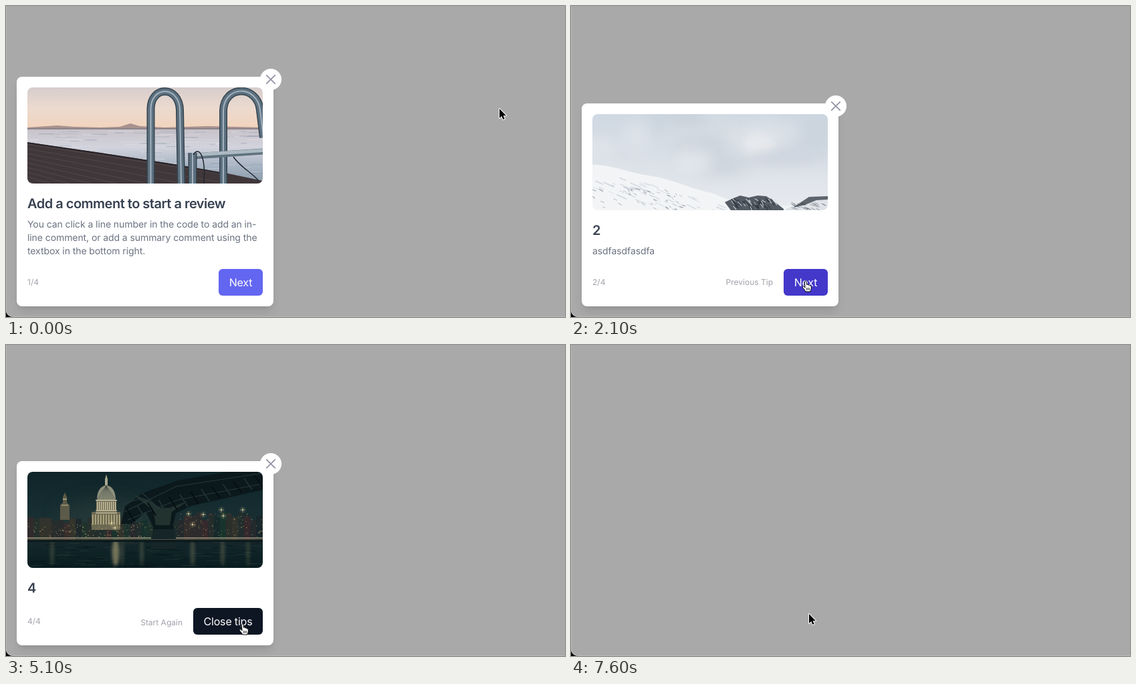
An HTML page with a canvas for the animation above (9570 ms loop, 836x466 px).

```html
<!DOCTYPE html>
<html lang="en">
<head>
<meta charset="utf-8">
<title>Tips</title>
<style>
  html, body { margin: 0; width: 100%; height: 100%; overflow: hidden; background: #000; }
  body { position: relative; font: 14px/20px Inter, sans-serif; font-optical-sizing: none;
    text-rendering: geometricPrecision; cursor: default; }
  #page { position: absolute; left: 0; top: 0; width: 836px; height: 466px; overflow: hidden;
    background: #a9a9a9; border-bottom-left-radius: 10px; box-shadow: inset 1px -1px #b8b8b8; }
  .card { position: absolute; left: 16px; bottom: 16px; width: 352px; padding: 16px; background: #fff;
    border-radius: 8px; visibility: hidden;
    box-shadow: 0 10px 15px -3px rgba(0,0,0,.1), 0 4px 6px -2px rgba(0,0,0,.05); }
  .card.on { visibility: visible; }
  .close { position: absolute; right: -12px; top: -12px; width: 32px; height: 32px;
    border-radius: 50%; background: #fff; }
  canvas { display: block; margin-bottom: 16px; border-radius: 8px; }
  h2 { margin: 0; font-size: 20px; line-height: 28px; font-weight: 600; letter-spacing: -.025em; color: #374151; }
  p { margin: 8px 0 0; letter-spacing: -.006em; color: #6b7280; white-space: nowrap; }
  footer { display: flex; align-items: center; height: 40px; margin-top: 16px;
    font-size: 12px; color: #a1a1aa; white-space: nowrap; }
  .link { margin: 0 16px 0 auto; }
  .btn { flex: none; border-radius: 6px; background: #6366f1; color: #fff; text-align: center;
    font-size: 16px; line-height: 40px; letter-spacing: -.011em; }
  .btn.hover { background: #4338ca; }
  .btn.dark { background: #0e1624; }
  #over { position: absolute; left: 0; top: 0; }
</style>
</head>
<body>
<div id="page"></div>
<svg id="over" width="836" height="466">
  <g id="ring" fill="none">
    <circle r="26.4" stroke="#fff" stroke-width="1.8"/>
    <circle r="28.6" stroke="#000" stroke-width="3"/>
  </g>
  <path id="arrow" d="M0 0V14L3.2 11.1L5.4 16L7.7 15L5.6 10.2H10Z" stroke="#fff" stroke-width="2"
    paint-order="stroke" stroke-linejoin="round"/>
  <g id="hand" stroke="#000" stroke-linejoin="round" stroke-linecap="round">
    <path fill="#fff" d="M-1.7 1.3C-1.7-.6 1-.6 1.1 1.3L1.5 5.4C2.2 4.6 3.5 4.8 3.8 6.2C4.8 5.4 6.1 5.9 6.3 7.2
      C7.3 6.6 8.3 7.2 8.3 8.4V11C8.3 13 7.1 13.6 7 16H-.4C-.8 13.6-3.2 12.2-4.7 9.4C-5.4 7.9-3.6 7.1-2.5 8.4L-1.2 9.8Z"/>
    <path fill="none" stroke-width=".8" d="M1.4 10.6V13.4M3.4 10.6V13.4M5.4 10.6V13.4"/>
  </g>
</svg>
<script>
const LOOP = 9570, STEP = 100;
const $ = id => document.getElementById(id);

let seed = 1;
const rnd = (a = 0, b = 1) => {
  seed = (seed * 16807) % 2147483647;
  return a + (b - a) * seed / 2147483647;
};

// Small drawing kit on a 352 x 144 canvas
const kit = c => ({
  fade(y, h, ...colors) {
    const g = c.createLinearGradient(0, y, 0, y + h);
    colors.forEach((k, i) => g.addColorStop(i / (colors.length - 1), k));
    c.fillStyle = g;
    c.fillRect(0, y, 352, h);
  },
  fill(color, d) { c.fillStyle = color; c.fill(new Path2D(d)); },
  line(color, w, d) { c.strokeStyle = color; c.lineWidth = w; c.stroke(new Path2D(d)); },
  rect(color, x, y, w, h) { c.fillStyle = color; c.fillRect(x, y, w, h); },
  blob(color, x, y, rx, ry, blur) {
    c.filter = `blur(${blur}px)`;
    c.fillStyle = color;
    c.beginPath();
    c.ellipse(x, y, rx, ry, 0, 0, 7);
    c.fill();
    c.filter = 'none';
  }
});

function pier({ fade, fill, line, rect }) {
  fade(0, 63, '#d6cdcc', '#ecdacf', '#f2d3bb');
  fill('#a8928f', 'M0 60L45 57L70 59L110 60L138 59L154 54L168 58L205 60L270 58L352 60V63H0Z');
  fade(62, 82, '#c8c2c9', '#d2d3dc', '#a9b5c4', '#8999a9');
  rect('#77727a', 0, 61.5, 352, 1.2);
  for (let i = 0; i < 130; i++) {
    const y = 65 + 78 * rnd() ** 1.3;
    rect(i % 2 ? 'rgba(116,132,153,.35)' : 'rgba(235,233,238,.4)', rnd(-20, 340), y, rnd(8, 38), rnd(.5, 1.4));
  }
  fill('#40373a', 'M0 82L110 98L220 115L300 129L352 140V144H0Z');
  for (let i = 0; i < 10; i++)
    line('rgba(112,94,90,.4)', 1, `M0 ${85 + i * 7}L300 ${131 + i * 13}`);
  line('#211f25', 1.5, 'M0 83L110 99L220 116L300 130');
  const tube = (w, d) => {
    line('#34444f', w, d);
    line('#5d707f', w - 3, d);
    line('#a3b3bf', 2, d);
  };
  tube(12, 'M293 144V35C294-4 344-4 348 34L353 75');
  line('#60737f', 9, 'M250 103L352 96');
  line('#adbac4', 5, 'M250 101L352 94.5');
  tube(13, 'M247 144V98');
  tube(12, 'M184.5 144V32C185-3 227-3 228 34L230 144');
  line('#20262d', 1.5, 'M248 101C256 88 267 100 264 144M308 104C320 121 334 126 346 140');
}

function peaks({ fade, fill, line, blob }) {
  fade(0, 144, '#cfd8e2', '#dbe1e8', '#e8eaee');
  for (let i = 0; i < 22; i++)
    blob(i % 2 ? 'rgba(192,201,213,.3)' : 'rgba(236,237,240,.35)', rnd(0, 352), rnd(0, 95), rnd(20, 48), rnd(12, 24), 10);
  blob('rgba(238,238,240,.7)', 250, 46, 24, 16, 7);
  blob('rgba(196,204,215,.5)', 285, 66, 50, 12, 8);
  fill('#f2f4f6', 'M0 76C30 76 52 87 84 92C120 97 150 113 178 118L205 129L290 138L352 124V144H0Z');
  for (let i = 0; i < 60; i++) {
    const x = rnd(0, 190), y = 84 + x * .24 + rnd(0, 32), w = rnd(4, 16);
    line('rgba(170,181,196,.4)', rnd(.6, 2), `M${x} ${y}l${w} ${w * .45}`);
  }
  for (let i = 0; i < 40; i++) {
    const x = rnd(0, 145);
    line('rgba(98,104,114,.55)', rnd(.5, 1.3), `M${x} ${rnd(105, 138) + x * .06}l${rnd(2, 6)} ${rnd(1, 4)}`);
  }
  fill('#555c65', 'M198 132L211 126L221 122L234 125L247 122L260 123L271 130L286 142V144H207Z');
  fill('#dfe3e8', 'M286 144L306 134L324 124L352 122V144Z');
  fill('#5e646c', 'M300 140L324 124L352 123V128L335 129L318 136Z');
  for (let i = 0; i < 60; i++) {
    const x = rnd(205, 272);
    line(i % 3 ? 'rgba(42,47,55,.7)' : 'rgba(218,224,231,.8)', 1.2, `M${x} ${rnd(126, 138)}l${rnd(2, 7)} ${rnd(3, 8)}`);
    if (i % 2) line('rgba(75,80,88,.5)', 1, `M${rnd(296, 345)} ${rnd(132, 142)}l6 3`);
  }
}

function night({ fade, fill, line, rect, blob }) {
  fade(0, 102, '#0f2529', '#152c30', '#1f3436');
  blob('rgba(70,80,70,.3)', 118, 66, 70, 22, 14);
  // Skyline
  for (let x = 0; x < 352; x += 9) {
    const y = x > 225 ? rnd(58, 74) : rnd(68, 78);
    rect(`rgba(${rnd(22, 58)},${rnd(38, 54)},44,.9)`, x, y, 9, 102 - y);
  }
  // Small tower
  fill('#5c5a48', 'M49 72V50L53 46V38L56 31L59 38V46L63 50V72Z');
  rect('#a39a78', 53, 40, 6, 2);
  rect('#918a6c', 51, 49, 10, 2);
  // Dome
  fill('#8d8f7b', 'M104 42C104 28 110 21 118 20C126 21 132 28 132 42Z');
  fill('#aaa88e', 'M116 20V11L118 4L120 11V20Z');
  rect('#77745d', 103, 42, 30, 18);
  rect('#6b6852', 96, 60, 43, 27);
  for (let x = 104; x < 133; x += 3) {
    rect('#cdc4a0', x, 45, 1.3, 12);
    line('rgba(58,66,60,.6)', .8, `M${x} 42Q${(x + 118) / 2} 29 118 21`);
  }
  for (const y of [42, 57.5, 61]) rect('#d6ccaa', 102, y, 32, 1.3);
  for (let x = 97; x < 138; x += 4) rect('#b9ae86', x, 64, 1.6, 15);
  // Window lights
  for (let i = 0; i < 320; i++) {
    const x = rnd(0, 352);
    rect(`rgba(218,186,122,${rnd(.15, .8)})`, x, rnd(x > 225 ? 62 : 76, 97), rnd(.6, 1.7), rnd(.6, 1.6));
  }
  // River
  fade(102, 42, '#16272a', '#0e2326', '#0a1c20');
  for (let i = 0; i < 110; i++)
    rect(i % 2 ? 'rgba(84,98,92,.2)' : 'rgba(4,14,18,.4)', rnd(-10, 340), rnd(105, 144), rnd(5, 24), 1);
  for (const [x, w, a] of [[37, 6, .2], [132, 11, .55], [142, 5, .2], [171, 5, .25], [247, 7, .25], [292, 6, .25], [330, 5, .2]])
    blob(`rgba(196,180,132,${a})`, x, 121, w / 2, 20, 2);
  // Bridge
  fill('#0b181c', 'M140 78L146 52L172 32L225 13L300 0H352V27L290 41L245 51L222 62L218 80L223 117H185L188 82L177 60L156 78Z');
  fill('#22322f', 'M158 34L188 58L192 80H213L216 60L240 44L212 54L199 54L180 42Z');
  fill('#162527', 'M187 86H220L224 116H184Z');
  line('#26373a', 1.2, 'M145 60L222 22L352 2M150 72L225 42L352 18M172 32L198 56M143 48L170 40');
  for (let i = 0; i < 13; i++)
    line(i % 2 ? '#1f3033' : '#060f13', 2, `M${148 + i * 16} ${54 - i * 4}l12 ${20 - i * .3}`);
  rect('#0b181b', 0, 102, 352, 3);
  rect('#a8a084', 0, 98.5, 185, 1.4);
  rect('#a8a084', 222, 98.5, 130, 1.4);
  rect('rgba(170,158,120,.5)', 0, 101, 352, .8);
  for (const [x, y] of [[126, 77], [131, 84], [241, 63], [263, 64], [290, 57], [293, 66], [322, 57], [247, 79]]) {
    blob('rgba(232,208,150,.5)', x, y, 2.5, 2.5, 2);
    rect('#fff0c5', x - .8, y - .8, 1.6, 1.6);
    line('rgba(240,220,170,.5)', .6, `M${x - 4} ${y}h8M${x} ${y - 4}v8`);
  }
}

const tips = [
  { art: pier, title: 'Add a comment to start a review', next: 'Next',
    text: 'You can click a line number in the code to add an in-<br>line comment, or add a summary comment using the<br>textbox in the bottom right.' },
  { art: peaks, title: '2', text: 'asdfasdfasdfa', link: 'Previous Tip', next: 'Next' },
  { title: '3', text: '3243443', link: 'Previous Tip', next: 'Next' },
  { art: night, title: '4', link: 'Start Again', next: 'Close tips', last: true }
];

const cards = tips.map((tip, i) => {
  const el = document.createElement('div');
  el.className = 'card';
  el.innerHTML = `
    <svg class="close" viewBox="-16 -16 32 32"><path d="M-6.2-6.2L6.2 6.2M6.2-6.2L-6.2 6.2"
      stroke="#9294a5" stroke-width="1.8" stroke-linecap="round"/></svg>
    ${tip.art ? '<canvas width="352" height="144"></canvas>' : ''}
    <h2>${tip.title}</h2>${tip.text ? `<p>${tip.text}</p>` : ''}
    <footer><span>${i + 1}/4</span>
      <span class="link" style="padding-top:${tip.last ? 4 : 0}px">${tip.link || ''}</span>
      <span class="btn${tip.last ? ' dark' : ''}" style="width:${tip.last ? 104 : 66}px">${tip.next}</span></footer>`;
  $('page').append(el);
  if (tip.art) {
    seed = 41 + i;
    tip.art(kit(el.querySelector('canvas').getContext('2d')));
  }
  return { el, btn: el.querySelector('.btn'), left: tip.last ? 280 : 318 };
});

const clicks = [1900, 3400, 5000, 7500];

// Pointer stops: time, x, y
const stops = [
  [0, 738, 154], [200, 738, 154], [1200, 352, 411], [1700, 351, 412], [2200, 351, 412],
  [2300, 362, 418], [2400, 360, 420], [2900, 360, 420], [3100, 354, 418], [3400, 354, 418],
  [3600, 353, 436], [3700, 350, 443], [3900, 350, 443], [4100, 318, 443], [4200, 338, 438],
  [4400, 354, 424], [4600, 354, 418], [5100, 354, 418], [5300, 353, 440], [5500, 352, 448],
  [5600, 352, 448], [6100, 356, 411], [6500, 356, 411], [6600, 357, 410], [7500, 356, 403], [LOOP, 356, 403]
];

function pointer(t) {
  const i = stops.findIndex(s => s[0] > t);
  const [t0, x0, y0] = stops[i - 1], [t1, x1, y1] = stops[i];
  const k = (t - t0) / (t1 - t0), e = k * k * (3 - 2 * k);
  return [x0 + (x1 - x0) * e, y0 + (y1 - y0) * e];
}

const show = (id, on) => $(id).style.display = on ? '' : 'none';

function draw(now) {
  const t = Math.floor((now % LOOP) / STEP) * STEP;
  const [x, y] = pointer(t);
  const current = clicks.filter(c => t > c).length;
  let hover = false;
  cards.forEach(({ el, btn, left }, i) => {
    const on = i === current;
    const over = on && x >= left && x < 384 && y >= 394 && y < 434;
    el.classList.toggle('on', on);
    btn.classList.toggle('hover', over);
    hover = hover || over;
  });
  show('ring', clicks.includes(t));
  show('hand', hover);
  show('arrow', !hover);
  for (const id of ['ring', 'hand', 'arrow'])
    $(id).setAttribute('transform', `translate(${x.toFixed(1)} ${y.toFixed(1)})`);
}

const start = performance.now();
function tick() {
  draw(performance.now() - start);
  requestAnimationFrame(tick);
}
tick();
</script>
</body>
</html>
```
